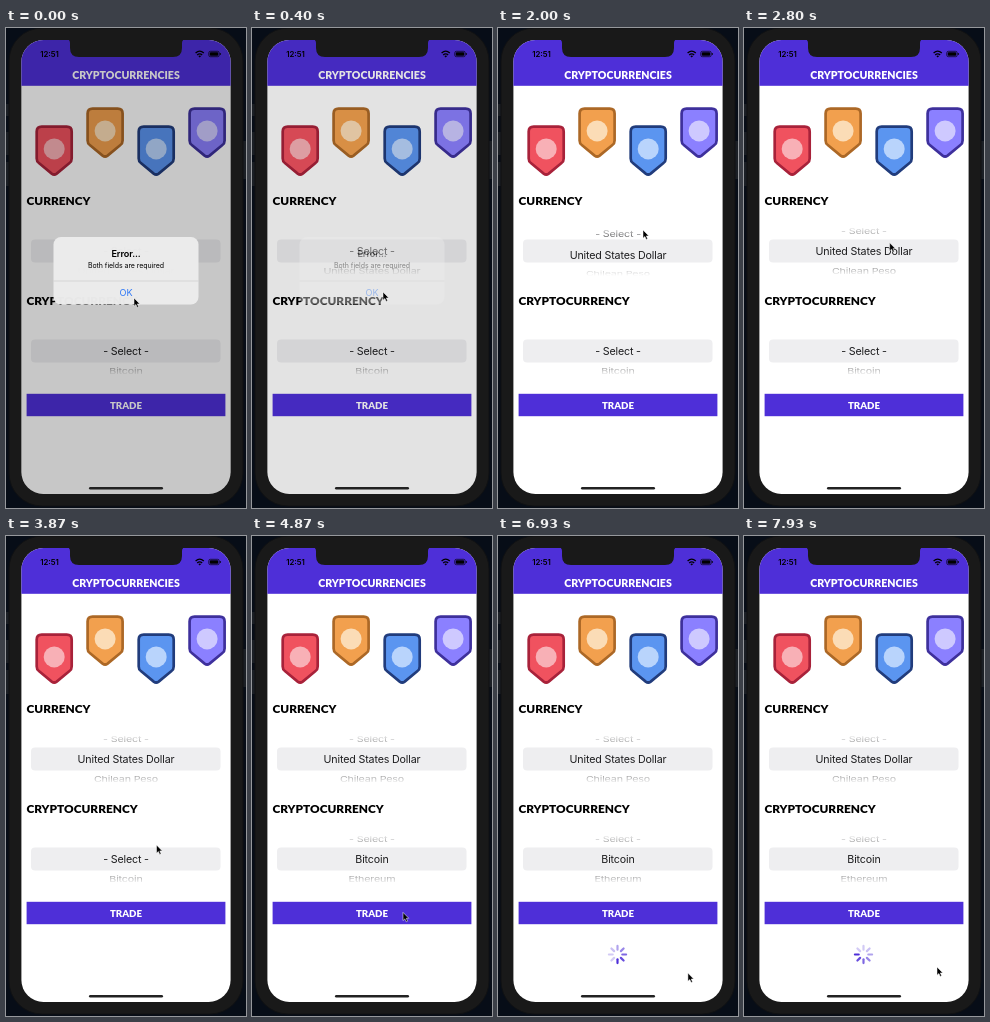
An HTML page for the animation above (8 s loop, 240 by 480 pixels).

```html
<!DOCTYPE html>
<html lang="en">
<head>
<meta charset="utf-8">
<title>Cryptocurrencies</title>
<style>
html, body { margin: 0; width: 100%; height: 100%; overflow: hidden; background: #070d17; }
svg { display: block; width: 100%; height: 100%; }
text { text-anchor: middle; font-family: Inter, Roboto, sans-serif; }
.head { font-family: Lato, sans-serif; font-weight: 900; }
.left { text-anchor: start; font-size: 11.85px; }
.row { font-size: 10.7px; letter-spacing: -.16px; fill: #1c1c1e; }
.body { fill: #191919; }
</style>
</head>
<body>
<svg viewBox="0 0 240 480" xmlns="http://www.w3.org/2000/svg">
  <defs>
    <clipPath id="screen"><rect x="15.4" y="12" width="209.2" height="454" rx="22"/></clipPath>
    <linearGradient id="fade" x2="0" y2="1">
      <stop offset="0" stop-color="#fff" stop-opacity="0"/>
      <stop offset=".2" stop-color="#fff"/>
      <stop offset=".8" stop-color="#fff"/>
      <stop offset="1" stop-color="#fff" stop-opacity="0"/>
    </linearGradient>
    <mask id="wheel" maskUnits="userSpaceOnUse" x="20" y="-25" width="200" height="50">
      <rect x="20" y="-25" width="200" height="50" fill="url(#fade)"/>
    </mask>
    <path id="shield" d="M6 1.2H31Q36 1.2 36 6V33Q36 36 33.8 37.6L21 48.2Q18.5 50 16 48.2L3.2 37.6Q1 36 1 33V6Q1 1.2 6 1.2Z" stroke-width="2.7"/>
  </defs>
  <rect width="240" height="480" fill="#070d17"/>
  <g fill="#1b1f25">
    <rect x="0" y="76" width="4" height="12"/>
    <rect x="0" y="104" width="4" height="23"/>
    <rect x="0" y="134" width="4" height="24"/>
    <rect x="236" y="113" width="4" height="38"/>
  </g>
  <rect class="body" x="3" y="0" width="234" height="478" rx="33" stroke="#101113"/>

  <g clip-path="url(#screen)">
    <rect x="15" y="12" width="210" height="454" fill="#fff"/>
    <rect x="15" y="12" width="210" height="45.8" fill="#4e2fd8"/>
    <text class="head" x="120" y="50.6" font-size="10.6" fill="#fff">CRYPTOCURRENCIES</text>
    <text x="43.5" y="28.9" font-size="7.8" font-weight="600">12:51</text>
    <g fill="none" stroke="#000" stroke-width="1.3">
      <path d="M189.6 25Q193.7 21.2 197.8 25"/>
      <path d="M191.2 27Q193.7 24.8 196.2 27"/>
      <rect x="202.8" y="23.3" width="10.4" height="5.4" rx="1.6" stroke-width=".7"/>
    </g>
    <path d="M192.3 28L193.7 29.4L195.1 28Q193.7 26.9 192.3 28Z"/>
    <rect x="203.8" y="24.3" width="8.4" height="3.4" rx=".8"/>
    <rect x="213.9" y="25" width=".9" height="2" rx=".4"/>
    <g id="badges"></g>
    <text class="head left" x="20.5" y="177.2">CURRENCY</text>
    <text class="head left" x="20.5" y="277.2">CRYPTOCURRENCY</text>
    <g id="pickers"></g>
    <rect id="button" x="20.6" y="365.8" width="198.8" height="22.4"/>
    <text id="trade" class="head" x="120" y="380.8" font-size="9.7" fill="#fff">TRADE</text>
    <g id="spinner" transform="translate(119.5 418.5)" stroke="#4e2fd8" stroke-width="2.2" stroke-linecap="round"></g>
    <rect id="dim" x="15" y="12" width="210" height="454"/>
    <g id="alert">
      <rect x="47.5" y="209" width="145" height="67.5" rx="7.5" fill="#ececec" fill-opacity=".98"/>
      <path d="M47.5 253H192.5" stroke="#c6c6c8" stroke-width=".6"/>
      <text x="120" y="229.2" font-size="9.1" font-weight="600" letter-spacing="-.1">Error...</text>
      <text x="120" y="240" font-size="7" letter-spacing="-.05">Both fields are required</text>
      <text x="120" y="268.2" font-size="9.1" fill="#2f78f6">OK</text>
    </g>
    <rect x="83" y="459" width="74" height="2.4" rx="1.2" fill="#222"/>
    <path class="body" d="M61 11Q64 12 64 15V20Q64 29 73 29H167Q176 29 176 20V15Q176 12 179 11Z"/>
  </g>
  <path id="cursor" d="M0 0V8.2L1.9 6.5L3.2 9.4L4.6 8.8L3.3 5.9H5.8Z" stroke="#fff" stroke-width=".5"/>
</svg>
<script>
const LOOP = 8000;
const PURPLE = '#4e2fd8';
const $ = id => document.getElementById(id);
const clamp = (v, lo = 0, hi = 1) => Math.min(hi, Math.max(lo, v));
const ease = k => k * k * (3 - 2 * k);

function add(parent, tag, attrs, text = '') {
  const el = document.createElementNS('http://www.w3.org/2000/svg', tag);
  for (const k in attrs) el.setAttribute(k, attrs[k]);
  el.textContent = text;
  return parent.appendChild(el);
}

// Eased value between keys of the form [time, ...values].
function track(keys, t) {
  const i = keys.findIndex(k => k[0] > t);
  if (i === 0) return keys[0].slice(1);
  if (i < 0) return keys[keys.length - 1].slice(1);
  const a = keys[i - 1], b = keys[i];
  const k = ease((t - a[0]) / (b[0] - a[0]));
  return a.slice(1).map((v, j) => v + (b[j + 1] - v) * k);
}

const badges = [
  [29.7, 97.4, '#f0525f', '#a8223a', '#f8b0b6'],
  [80.6, 79.4, '#f2a04e', '#ac6826', '#fbdcb6'],
  [131.7, 97.4, '#5b95f0', '#213c7c', '#b9d4fc'],
  [182.6, 79.4, '#8b80ff', '#3e309c', '#cec9ff']
];
for (const [x, y, fill, stroke, mark] of badges) {
  const g = add($('badges'), 'g', { transform: `translate(${x} ${y})` });
  add(g, 'use', { href: '#shield', fill, stroke });
  add(g, 'circle', { cx: 18.5, cy: 23.5, r: 10.5, fill: mark });
}

function makePicker(y, names, keys) {
  const g = add($('pickers'), 'g', { transform: `translate(0 ${y})` });
  add(g, 'rect', { x: 25, y: -11.5, width: 189.5, height: 23, rx: 4, fill: '#eeeef0' });
  const wheel = add(g, 'g', { mask: 'url(#wheel)' });
  const rows = names.map(n => add(wheel, 'text', { class: 'row', y: 3.9 }, n));
  return { rows, keys };
}

const pickers = [
  makePicker(223, ['- Select -', 'United States Dollar', 'Chilean Peso'],
    [[1350, 0], [2000, .82], [2450, 1]]),
  makePicker(323, ['- Select -', 'Bitcoin', 'Ethereum'],
    [[3950, 0], [4300, .7], [4700, 1]])
];

const STEP = 44 * Math.PI / 180, RADIUS = 28.8;
function turn({ rows, keys }, t) {
  const [pos] = track(keys, t);
  rows.forEach((row, i) => {
    const d = i - pos, angle = d * STEP;
    const y = RADIUS * Math.sin(angle), squash = Math.max(0, Math.cos(angle));
    row.setAttribute('transform', `translate(120 ${y}) scale(1 ${squash})`);
    row.setAttribute('opacity', clamp(1.2 - .7 * Math.abs(d)));
  });
}

const blades = Array.from({ length: 8 }, (_, i) =>
  add($('spinner'), 'path', { d: 'M0 -4.8V-8.6', transform: `rotate(${i * 45})` }));

function spin(t) {
  $('spinner').setAttribute('visibility', t >= 5950 ? 'visible' : 'hidden');
  const head = 6 + Math.floor((t - 7900) / 100);
  blades.forEach((b, i) => {
    const behind = (((head - i) % 8) + 8) % 8;
    b.setAttribute('opacity', Math.max(.25, 1 - behind * .14));
  });
}

const pointer = [
  [150, 128, 270], [400, 131, 264], [900, 141, 223], [1300, 141, 223],
  [1950, 145, 202], [2650, 145, 202], [3350, 150.5, 309], [3900, 150.5, 309],
  [4250, 151, 296], [4500, 151, 296], [5050, 151, 403], [5330, 151, 380],
  [5560, 151, 380], [5850, 151, 413], [5900, 151, 413], [6130, 155, 446],
  [6500, 172, 454], [6950, 190, 437], [7200, 193, 431]
];

function draw(t) {
  const shown = 1 - ease(clamp((t - 200) / 400));
  $('dim').setAttribute('opacity', .22 * shown);
  $('alert').setAttribute('opacity', shown ** 1.3);
  pickers.forEach(p => turn(p, t));
  const pressed = t >= 5420 && t < 5580;
  $('button').setAttribute('fill', pressed ? '#000' : PURPLE);
  $('trade').setAttribute('opacity', pressed ? .85 : 1);
  spin(t);
  $('cursor').setAttribute('transform', `translate(${track(pointer, t)})`);
}

const start = performance.now();
function frame() {
  draw((performance.now() - start) % LOOP);
  requestAnimationFrame(frame);
}
frame();
</script>
</body>
</html>
```
